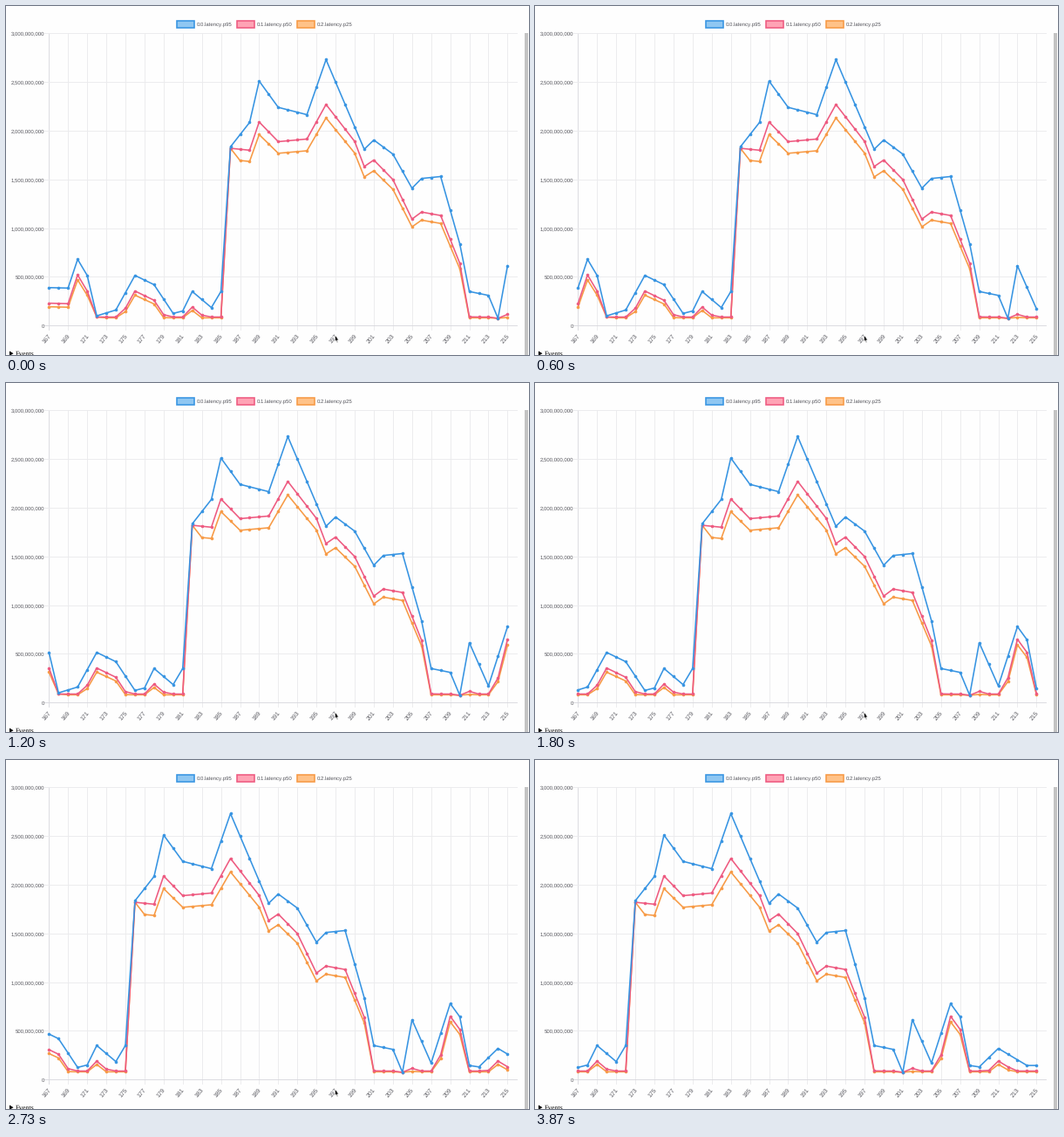
Write a matplotlib script that moves like this. It is 600 px wide and 400 px high and loops after 3.9 s.

```python
import matplotlib.pyplot as plt
import numpy as np
from matplotlib.animation import FuncAnimation
from matplotlib.patches import Polygon, Rectangle

W, H, DPI = 600, 400, 100
FRAMES, INTERVAL = 130, 30
LEFT, RIGHT, TOP, BASE = 49.3, 586, 31.3, 366.3
STEP = 10.96        # pixels between two samples
VISIBLE = 49        # samples on screen
FIRST_SHIFT, SHIFT_EVERY = 30, 296   # ms
TEXT = "#55555c"

# Turning points of the slowest latency: (sample, millions)
TURNS = [(0, 390), (2, 385), (3, 680), (4, 515), (5, 100), (7, 160),
         (9, 515), (11, 420), (13, 125), (14, 150), (15, 350), (17, 185),
         (18, 350), (19, 1835), (21, 2085), (22, 2510), (24, 2240),
         (27, 2165), (29, 2730), (33, 1810), (34, 1905), (36, 1760),
         (38, 1410), (39, 1510), (41, 1530), (43, 840), (44, 350),
         (46, 310), (47, 75), (48, 615), (50, 170), (52, 780), (53, 645),
         (54, 145), (55, 130), (57, 320), (60, 145)]
# How far the median lies below it
GAPS = [(0, 160), (17, 160), (18, 268), (19, 15), (22, 420), (27, 250),
        (29, 460), (32, 150), (41, 400), (43, 200), (48, 500), (52, 130)]
FLOOR = 80

plt.rcParams["text.hinting"] = "none"
plt.rcParams["text.hinting_factor"] = 1


def pt(px):
    return px * 72 / DPI


def y_of(millions):
    return BASE - millions * (BASE - TOP) / 3000


def through(points, at):
    return np.interp(at, *zip(*points))


def label(x, y, text, size=6.4, **kw):
    kw = {"color": TEXT, "family": "Liberation Sans",
          "va": "center_baseline", **kw}
    ax.text(x, y, text, fontsize=pt(size), **kw)


def segment(x0, y0, x1, y1, strong):
    color = "#d9d9de" if strong else "#ebebed"
    ax.plot([x0, x1], [y0, y1], color=color, lw=pt(0.9), zorder=1)


def draw_axes():
    for k in range(0, VISIBLE, 2):
        x = LEFT + k * STEP
        segment(x, TOP, x, BASE + 5, k == 0)
        label(x - 2.6, 381, str(167 + k), 7.2, ha="center", va="center",
              rotation=50)
    for value in range(0, 3001, 500):
        y = y_of(value)
        segment(LEFT - 5, y, RIGHT, y, value == 0)
        label(44.3, y, f"{value * 1000000:,}", ha="right")


def draw_legend():
    for k, (name, _, line, fill) in enumerate(SERIES):
        x = 195 + 69 * k
        ax.add_patch(Rectangle((x + 1, 17), 20, 7.6, fc=fill, ec=line,
                               lw=pt(1.6), joinstyle="miter"))
        label(x + 24, 20.8, name)


def draw_page():
    ax.add_patch(Rectangle((595.3, 31), 3.6, 372, fc="#c3c3c3", lw=0))
    ax.add_patch(Polygon([(4, 395.5), (8.5, 398.2), (4, 401)],
                         fc="black", lw=0))
    label(11, 401.3, "Events", 8.3, color="black",
          family="Liberation Serif", va="baseline")


samples = np.arange(62)
p95 = through(TURNS, samples)
p50 = np.maximum(p95 - through(GAPS, samples), np.minimum(p95, FLOOR + 8))
p25 = np.maximum(0.95 * p50 - 25, np.minimum(p50, FLOOR))
p25[p95 - p50 < 20] = p50[p95 - p50 < 20]

# name, samples, line colour, legend fill
SERIES = [
    ("0.0.latency.p95", p95, "#3794e2", "#8fc7f2"),
    ("0.1.latency.p50", p50, "#ee5a80", "#ffa3b5"),
    ("0.2.latency.p25", p25, "#f79a45", "#ffc288"),
]

fig = plt.figure(figsize=(W / DPI, H / DPI), dpi=DPI, facecolor="#fefefe")
ax = fig.add_axes([0, 0, 1, 1])
ax.set_xlim(0, W)
ax.set_ylim(H, 0)
ax.axis("off")

draw_axes()
draw_legend()
draw_page()

xs = LEFT + STEP * np.arange(VISIBLE)
lines = []
for order, (_, _, color, _) in enumerate(SERIES):
    line, = ax.plot(xs, xs, color=color, lw=pt(1.6), marker="o",
                    ms=pt(2.9), mec=color, mew=pt(0.7), mfc=color,
                    solid_joinstyle="round", zorder=5 - order)
    lines.append(line)

ARROW = np.array([(0, 0), (0, 7.6), (1.4, 6.4), (2.4, 9), (3.4, 8.5),
                  (2.4, 6), (4.2, 5.8)])
cursor = Polygon(ARROW, fc="black", ec="white", lw=pt(0.6), zorder=9)
ax.add_patch(cursor)


def cursor_y(t):
    p = min(max((t - 3060) / 210, 0), 1)
    return 377 - 19 * p * p * (3 - 2 * p)


def update(i):
    t = i * INTERVAL
    shift = 0 if t < FIRST_SHIFT else 1 + (t - FIRST_SHIFT) // SHIFT_EVERY
    for line, (_, data, *_) in zip(lines, SERIES):
        line.set_ydata(y_of(data[shift:shift + VISIBLE]))
    cursor.set_xy(ARROW + (377.5, cursor_y(t)))
    cursor.set_visible(t < 3540)
    return [*lines, cursor]


anim = FuncAnimation(fig, update, frames=FRAMES, interval=INTERVAL,
                     repeat=True, repeat_delay=0, blit=False)
plt.show()
```
